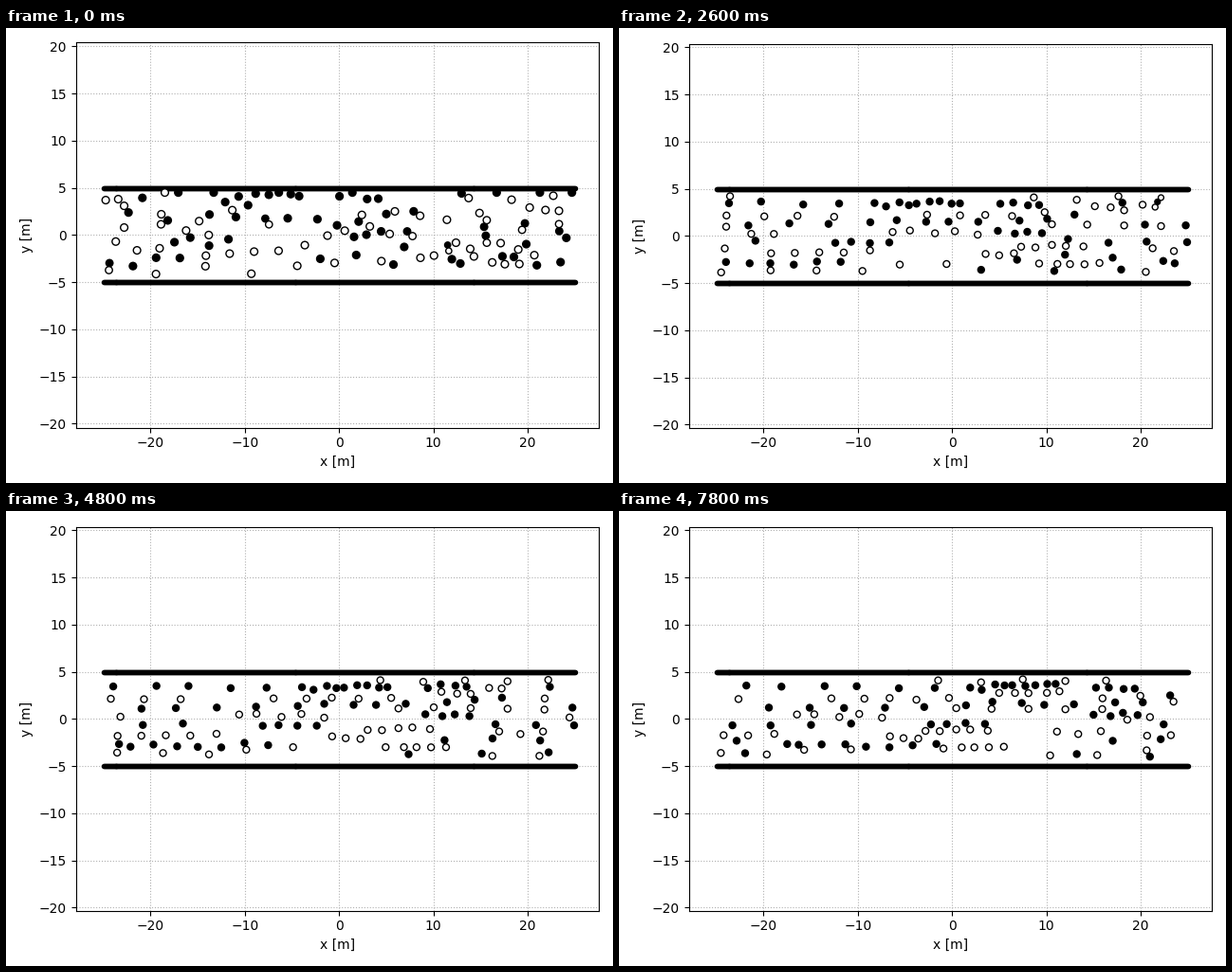
A matplotlib script that plays this animation: 640 px wide and 480 px high, repeating every 8000 ms.

```python
import numpy as np
import matplotlib.pyplot as plt
from matplotlib.animation import FuncAnimation
from matplotlib.patches import Circle

W, H, DPI = 640, 480, 100
FRAMES, INTERVAL = 40, 200
HALF_LEN, WALL = 25.0, 5.0
STEP = 0.39          # metres walked per frame
MID = 20             # frame at which the lanes have formed
X_LIM = (-27.92, 27.52)

# lanes at MID: y, first x, last x, walkers (x wraps round the corridor)
RIGHTWARD = [
    (3.3, -5.4, 3.8, 9), (3.2, 7.8, 11.9, 4), (3.4, 20.7, 40.8, 6),
    (2.1, 10, 15.8, 3), (1.5, -6, 5.5, 5), (1.2, 23.3, 39.6, 5),
    (0.4, 7.8, 12.1, 4), (-0.7, -9.8, -3.9, 4), (-0.6, 14.9, 32, 5),
    (-2.3, 9.7, 24.8, 4), (-2.9, 26.4, 40.8, 7), (-3.8, 6, 20.7, 3),
]
LEFTWARD = [
    (4, 5.9, 23.7, 5), (3.1, 12.4, 18.9, 5), (2.2, -5.2, 6.8, 5),
    (2.2, 23.4, 34.8, 4), (1.1, 8.1, 23.2, 5), (0.4, -9.4, 0, 5),
    (0.2, 26.2, 28.6, 2), (-1, 4.7, 11, 5), (-1.5, 18.5, 23, 3),
    (-1.8, -22, -11.6, 5), (-2.1, 0.7, 3.7, 3), (-2.9, -8.2, -3.4, 2),
    (-3, 6.7, 12.8, 5), (-3.7, 17.8, 37.9, 5),
]

rng = np.random.default_rng(4)


def fill(lanes):
    x = np.concatenate([np.linspace(a, b, k) for _, a, b, k in lanes])
    y = np.repeat([lane[0] for lane in lanes], [lane[3] for lane in lanes])
    return x, y


def wrap(x):
    return (x + HALF_LEN) % (2 * HALF_LEN) - HALF_LEN


right, left = fill(RIGHTWARD), fill(LEFTWARD)
mid_x, lane_y = np.hstack([right, left])
heading = np.repeat([1, -1], [len(right[0]), len(left[0])])
opposed = heading[:, None] != heading[None, :]
mid_x = mid_x + rng.normal(0, 0.15, mid_x.size)
lane_y = lane_y + rng.normal(0, 0.12, lane_y.size)
scatter = rng.normal(0, 0.45, lane_y.size)
scatter[(heading > 0) & (lane_y > 3)] += 0.7   # crowd along the upper wall


def walk(n):
    """Positions and radii of all walkers at step n."""
    x = wrap(mid_x + heading * STEP * (n - MID))
    y = lane_y + scatter * np.exp(-n / 6)

    # step aside for oncoming walkers
    dx = wrap(x[:, None] - x)
    dy = y[:, None] - y
    room = np.clip(0.75 - np.abs(dy), 0, None)
    push = 0.5 * room * np.sign(dy) * np.exp(-(dx / 0.9) ** 2)
    y = np.clip(y + (push * opposed).sum(axis=1), -4.4, 4.5)

    # squeeze when shoulders touch
    gap = np.hypot(dx, y[:, None] - y)
    np.fill_diagonal(gap, 9)
    full = 0.35 + 0.04 * np.exp(-n / 2)
    return x, y, np.clip(gap.min(axis=1) / 2, 0.27, full)


fig, ax = plt.subplots(figsize=(W / DPI, H / DPI), dpi=DPI)
ax.set_xlabel("x [m]")
ax.set_ylabel("y [m]")
ax.grid(linestyle=":")
ax.set_xlim(X_LIM)
wall_x = np.linspace(-HALF_LEN, HALF_LEN, 501)
for side in (-WALL, WALL):
    ax.plot(wall_x, np.full_like(wall_x, side), "k.")


def equal_scale():
    """Choose the y range that makes a metre equally long both ways."""
    box = ax.get_position()
    half = (X_LIM[1] - X_LIM[0]) / 2 * box.height * H / (box.width * W)
    ax.set_ylim(-half, half)


def settle(rounds):
    """Axes boxes of repeated layout passes, each fitting the last labels."""
    boxes = []
    for _ in range(rounds):
        equal_scale()
        fig.tight_layout()
        boxes.append(ax.get_position().frozen())
    return boxes


boxes = settle(10)

dots = []
for d in heading:
    face = "black" if d > 0 else "white"
    dot = Circle((0, 0), 0.35, facecolor=face, edgecolor="black", lw=1.0, zorder=3)
    dots.append(ax.add_patch(dot))


def update(n):
    ax.set_position(boxes[min(n, len(boxes) - 1)])
    equal_scale()
    for dot, x, y, r in zip(dots, *walk(n)):
        dot.center = (x, y)
        dot.radius = r
    return dots


anim = FuncAnimation(fig, update, frames=FRAMES, interval=INTERVAL,
                     init_func=lambda: update(0), repeat=True, repeat_delay=0)
plt.show()
```
